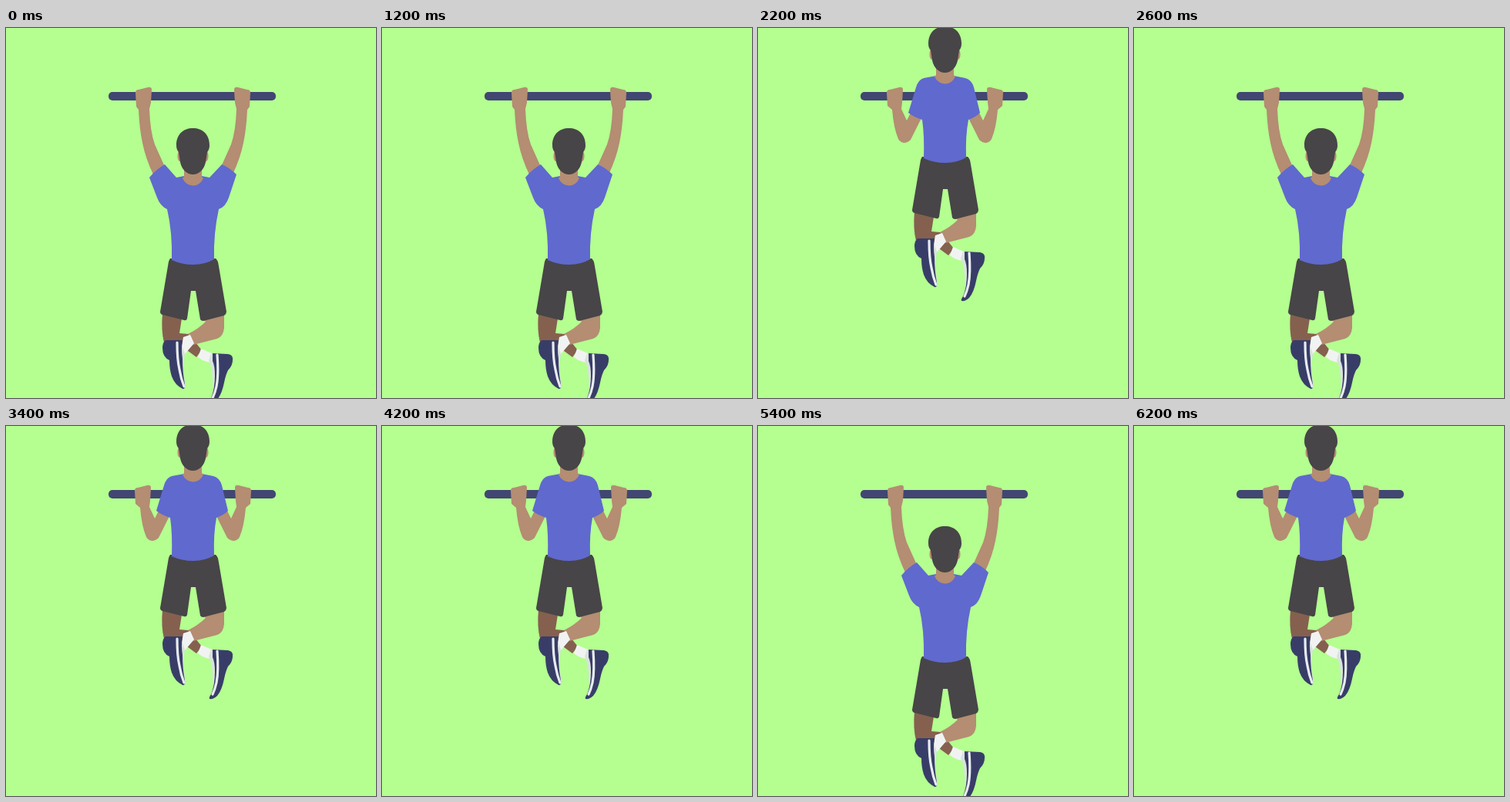
These frames come from a looping animation (480x480 px, 6.3 s). An HTML page:

```html
<!DOCTYPE html>
<html lang="en">
<head>
<meta charset="utf-8">
<title>Pull-ups</title>
<style>
  html, body { margin: 0; height: 100%; overflow: hidden; background: #b4ff90; }
  svg { display: block; width: 100%; height: 100%; }
  .skin { fill: #b48d72; }
  .shade { fill: #85604f; }
  .shirt { fill: #6069ce; }
  .dark { fill: #474547; }
  .navy { fill: #383d68; }
  .white { fill: #f1f3f3; }
  .sole { fill: #d9e2dd; }
  .bar { fill: #424672; }
  .stripe { fill: none; stroke: #e8ecf0; stroke-width: 3.2; stroke-linecap: round; }
</style>
</head>
<body>
<svg viewBox="0 0 480 480">
  <defs>
    <g id="armUp">
      <path class="skin" d="M167 84Q167 80 171 80L183 77Q188 76 188 80L187 97L186 105L193 120L198 110L212 117L198 145Q194 149 189 149Q184 148 182 144Q176 130 174 106L168 101Z"/>
    </g>
    <g id="armDown">
      <path class="skin" d="M168 84Q168 80 172 80L184 77Q189 76 189 80L188 97L186 105Q187 134 193 151L206 180L191 190Q181 169 177 149Q173 130 172 106L169 102Z"/>
    </g>
  </defs>

  <rect class="bar" x="133" y="83" width="217" height="11" rx="5"/>

  <g id="body">
    <path class="shade" d="M203 238L228 245L225 264L237 265L254 286L247 295L224 278L205 276Q201 260 203 238Z"/>
    <path class="skin" d="M254 245L283 238L283 257Q282 268 274 271L243 279L236 265Q250 258 259 249Z"/>
    <path class="white" d="M253 284L267 290L266 302Q256 301 249 295Z"/>
    <path class="white" d="M230 269L239 266L244 277L232 291L226 292Z"/>

    <path class="sole" d="M228 280L232 290Q230 305 231 318L233 334L228 332Z"/>
    <path class="navy" d="M207 273L229 273Q227 284 229 297Q229 315 232 330Q233 337 229 336Q219 331 215 320Q212 311 212 299Q203 295 203 283Q203 276 207 273Z"/>
    <path class="stripe" d="M222 276Q222 298 225 311Q227 323 231 333"/>

    <path class="sole" d="M266 290L263 299Q268 310 268 322L269 338L274 320V291Z"/>
    <path class="navy" d="M268 290L288 291Q295 292 294 299Q294 306 288 312Q285 318 283 328Q280 343 274 350Q269 355 264 354Q263 352 266 348Q271 336 271 319Q271 306 268 300Z"/>
    <path class="stripe" d="M274 292Q276 318 273 333Q271 342 268 348"/>

    <path class="dark" d="M213 167L272 167Q275 169 276 177L286 236Q286 239 283 241L256 248Q253 248 252 246L246 209L240 209L235 245Q234 248 231 247L203 240Q200 239 200 236L210 177Q211 169 213 167Z"/>
  </g>

  <g id="up">
    <use href="#armUp"/>
    <use href="#armUp" transform="matrix(-1 0 0 1 485 0)"/>
    <path class="shirt" d="M231 62L215 65Q208 67 205 77L195 110Q203 116 213 119Q216 140 215 169Q228 175 243 175Q258 175 270 168Q269 140 273 119Q282 116 288 110L280 77Q277 67 269 65L254 62Z"/>
  </g>
  <g id="down">
    <use href="#armDown"/>
    <use href="#armDown" transform="matrix(-1 0 0 1 485 0)"/>
    <path class="shirt" d="M231 192L221 194L206 177Q195 183 186 194L196 220Q200 231 209 235Q216 265 215 301Q228 307 243 307Q258 307 270 300Q269 267 276 235Q285 232 289 220L299 190Q290 181 280 177L264 194L254 192Z"/>
  </g>

  <g id="head">
    <path class="skin" d="M231 45H254V61L256 63Q252 72 243 72.500Q233 72 229 63L231 61Z"/>
    <ellipse class="skin" cx="225.500" cy="34" rx="3" ry="7"/>
    <ellipse class="skin" cx="259.500" cy="34" rx="3" ry="7"/>
    <path class="dark" d="M221 20C221 6 230 -2 242.500 -2S264 6 264 20Q264 26 261 29L259 42C257 52 250 58 242.500 58S228 52 226 42L224 29Q221 26 221 20Z"/>
  </g>
</svg>
<script>
  const LOOP = 6300, DROP = 132;
  const SWITCHES = [1300, 2300, 3400, 4400, 5500]; // pose flips, starting from the hang
  const [body, head, up, down] = ["body", "head", "up", "down"].map(id => document.getElementById(id));

  function draw(now) {
    const t = now % LOOP;
    const raised = SWITCHES.filter(s => s <= t).length % 2 === 1;
    for (const part of [body, head]) {
      part.setAttribute("transform", `translate(0 ${raised ? 0 : DROP})`);
    }
    up.style.display = raised ? "" : "none";
    down.style.display = raised ? "none" : "";
  }

  function tick() {
    draw(performance.now());
    requestAnimationFrame(tick);
  }
  tick();
</script>
</body>
</html>
```
